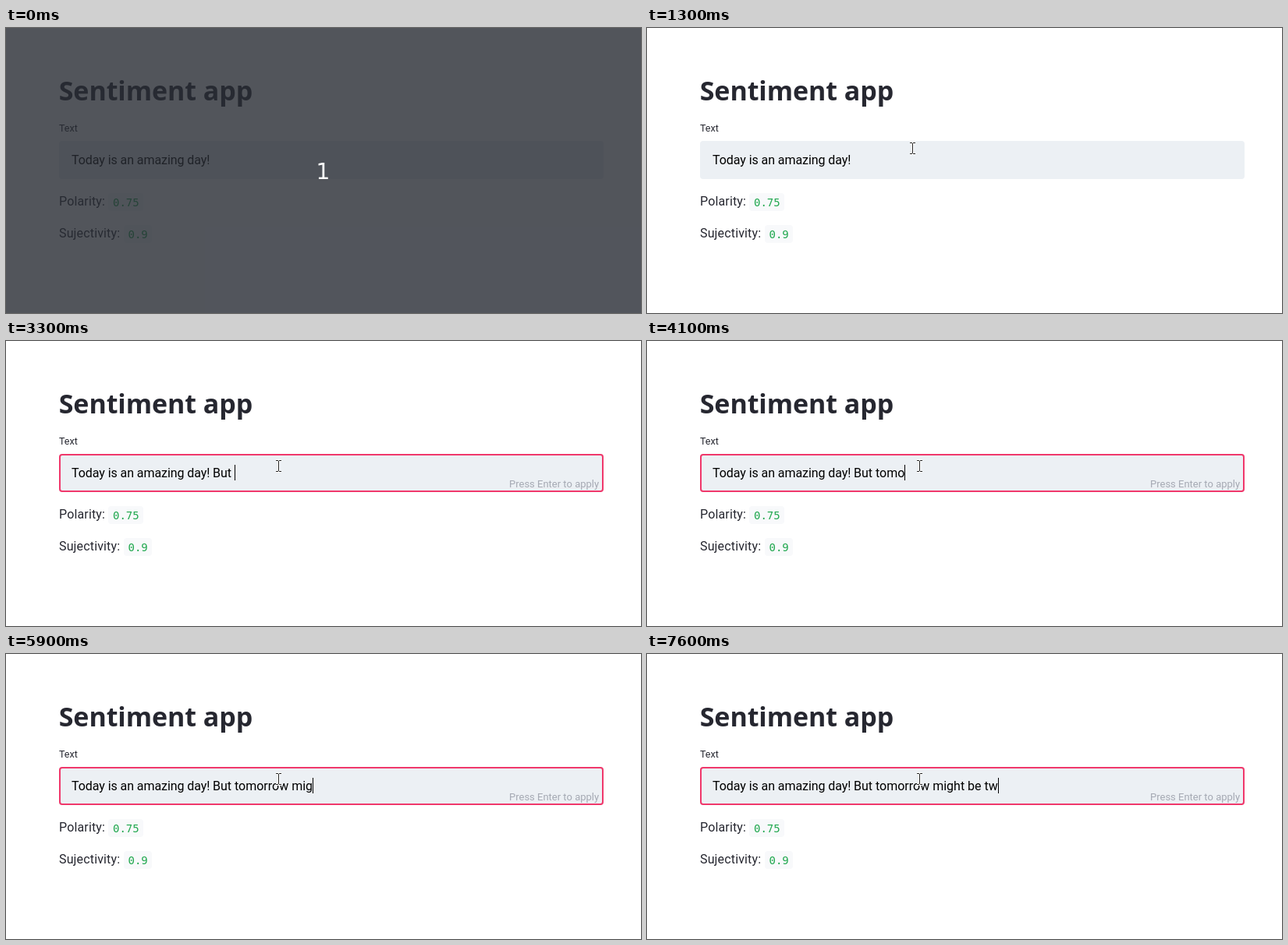
An HTML page that plays this animation: 814 by 366 pixels, repeating every 8000 ms.

```html
<!DOCTYPE html>
<html lang="en">
<head>
<meta charset="utf-8">
<title>Sentiment app</title>
<style>
  html, body { margin: 0; width: 100%; height: 100%; overflow: hidden; background: #fff; }
  svg { display: block; width: 814px; height: 366px; }
  text { font: 16px Roboto, sans-serif; fill: #262730; white-space: pre; }
  .title { font: 700 34px "Noto Sans", sans-serif; letter-spacing: -.06px; }
  .small { font-size: 12.5px; }
  .label { letter-spacing: .15px; }
  .field { fill: #000; }
  .lead { letter-spacing: -.07px; }
  .hint { font-size: 13px; fill: #a5a9b3; }
  .code { font: 14px "DejaVu Sans Mono", monospace; fill: #21a84f; }
  .count { font: 28px "DejaVu Sans", sans-serif; fill: #fff; }
  .chip { fill: #f8f9fb; }
  .off { visibility: hidden; }
</style>
</head>
<body>
<svg viewBox="0 0 814 366">
  <text class="title" x="67.7" y="93">Sentiment app</text>
  <text class="small" x="68" y="133">Text</text>

  <rect x="68" y="145" width="698" height="49" rx="4" fill="#ecf0f4"/>
  <rect id="ring" x="69" y="146" width="696" height="47" rx="3" fill="none" stroke="#f0386b" stroke-width="2"/>
  <text class="field lead" x="84" y="175">Today is an amazing day!</text>
  <text class="field" id="typed" x="265" y="175"></text>
  <rect id="caret" y="159" width="1" height="20"/>
  <text class="hint" id="hint" x="645" y="188">Press Enter to apply</text>

  <text class="label" x="68" y="228">Polarity:</text>
  <rect class="chip" x="131" y="212" width="45" height="23" rx="4"/>
  <text class="code" x="137" y="229">0.75</text>
  <text class="label" x="68" y="269">Sujectivity:</text>
  <rect class="chip" x="151" y="253" width="36" height="23" rx="4"/>
  <text class="code" x="156.5" y="270">0.9</text>

  <g id="arrow">
    <path d="M.5 .5V15L4 11.8L6.3 17.2L8.6 16.2L6.3 11H10.5Z" fill="#000" stroke="#fff"/>
  </g>
  <g id="beam" fill="none">
    <path d="M-3-6.5H4M-3 7.5H4M.5-6V7" stroke="#fff" stroke-width="3"/>
    <path d="M-3-6.5H0M1-6.5H4M-3 7.5H0M1 7.5H4M.5-6V7" stroke="#222"/>
  </g>

  <g id="cover">
    <rect width="814" height="366" fill="#272b33" fill-opacity=".8"/>
    <text class="count" x="397.6" y="194">1</text>
  </g>
</svg>
<script>
  const LOOP = 8000;
  const el = id => document.getElementById(id);
  const [ring, typed, caret, hint, arrow, beam, cover] =
    ["ring", "typed", "caret", "hint", "arrow", "beam", "cover"].map(el);

  // Pointer stops: time, shape, x, y
  const stops = [
    [700, arrow, 280, 53], [800, arrow, 283, 47], [1100, arrow, 314, 98],
    [1200, beam, 344, 156], [1300, beam, 340, 154], [1500, beam, 349, 160]
  ];
  // Keystrokes: time, characters added
  const keys = [
    [2800, "B"], [3000, "u"], [3100, "t"], [3300, " "], [3600, "t"], [3900, "om"],
    [4100, "o"], [4200, "r"], [4400, "r"], [4700, "ow"], [4900, " "], [5100, "m"],
    [5300, "i"], [5900, "g"], [6200, "h"], [6300, "t"], [6500, " "], [6600, "b"],
    [6900, "e "], [7300, "t"], [7600, "w"]
  ];

  const show = (node, on) => node.classList.toggle("off", !on);
  const until = (list, t) => list.filter(item => item[0] <= t);

  function draw(t) {
    const text = until(keys, t).map(key => key[1]).join("");
    if (typed.textContent !== text) typed.textContent = text;
    const width = text ? typed.getComputedTextLength() : 0;
    caret.setAttribute("x", Math.round(265 + width));

    const focused = t >= 1600;
    show(ring, focused);
    show(caret, focused && !(t >= 2400 && t < 2600));
    show(hint, text);
    show(cover, t < 100);

    const [, shape, x, y] = until(stops, t).pop() || [];
    show(arrow, shape === arrow);
    show(beam, shape === beam);
    if (shape) shape.setAttribute("transform", `translate(${x} ${y})`);
  }

  const start = performance.now();
  function tick() {
    draw((performance.now() - start) % LOOP);
    requestAnimationFrame(tick);
  }
  draw(0);
  requestAnimationFrame(tick);
</script>
</body>
</html>
```
